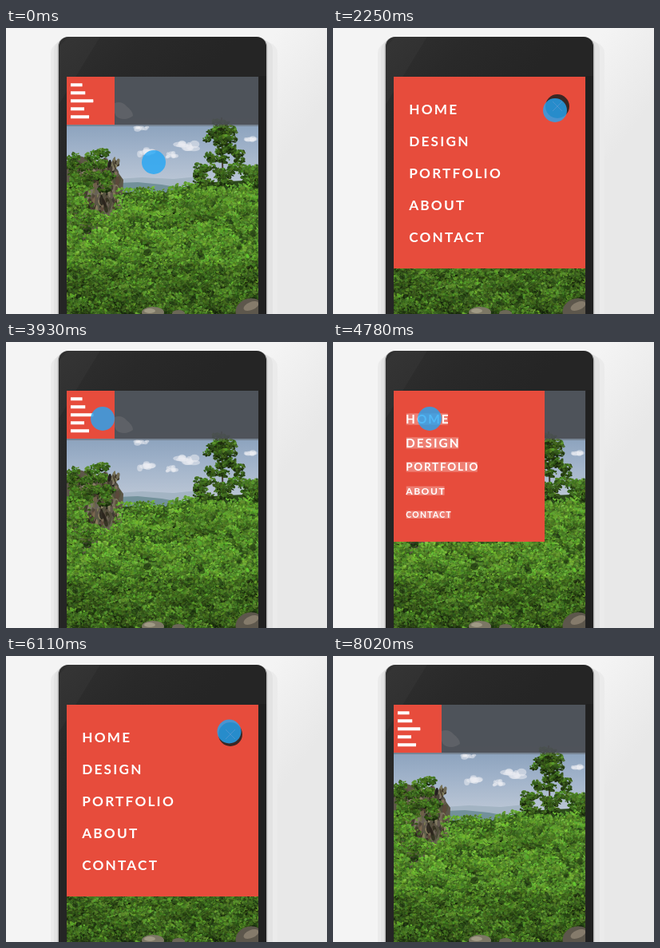
Animation, 402 px wide and 358 px high, one loop 8660 ms. Source, as an HTML page with a canvas:

```html
<!DOCTYPE html>
<html lang="en">
<head>
<meta charset="utf-8">
<title>Expanding menu</title>
<style>
html, body { margin: 0; width: 100%; height: 100%; overflow: hidden; background: #f4f4f4; }
canvas, svg { position: absolute; left: 0; top: 0; width: 402px; height: 358px; display: block; }
text { font: 700 17.2px Lato, "Open Sans", sans-serif; letter-spacing: 2.2px; fill: #fff; }
</style>
</head>
<body>
<canvas id="scene" width="402" height="358"></canvas>
<svg viewBox="0 0 402 358">
  <rect x="76" y="61" width="240" height="60" fill="#4b4e53" fill-opacity=".93"/>
  <path d="M136 94q9-3 15 4q8 6 8 12q-8 6-17 3q-6-3-6-8z" fill="#77797a" opacity=".4"/>
  <rect x="76" y="121" width="240" height="2" fill="#555" opacity=".4"/>
  <rect id="panel" x="76" y="61" fill="#e74c3c"/>
  <g id="items"></g>
  <g id="close">
    <circle cx="281" cy="98" r="15" fill="#3a2725"/>
    <path d="M275 92l12 12m0-12l-12 12" stroke="#e74c3c" fill="none"/>
  </g>
  <circle id="pointer" r="15" fill="#23a6f5" fill-opacity=".8"/>
</svg>
<script>
const LOOP = 8660;
const $ = id => document.getElementById(id);
const clamp = v => Math.max(0, Math.min(1, v));
const mix = (a, b, k) => a + (b - a) * k;
const smooth = k => k * k * (3 - 2 * k);

// CSS "ease": cubic-bezier(.25, .1, .25, 1)
function ease(x) {
  if (x <= 0) return 0;
  if (x >= 1) return 1;
  let lo = 0, hi = 1;
  for (let i = 0; i < 24; i++) {
    const u = (lo + hi) / 2, v = 1 - u;
    if (.75 * v * v * u + .75 * v * u * u + u * u * u < x) lo = u; else hi = u;
  }
  const v = 1 - lo;
  return .3 * v * v * lo + 3 * v * lo * lo + lo ** 3;
}

/* ---------- still scene ---------- */

const ctx = $('scene').getContext('2d');
let seed = 77;
function rnd() {
  seed = (seed + 0x6D2B79F5) | 0;
  let t = Math.imul(seed ^ seed >>> 15, 1 | seed);
  t = t + Math.imul(t ^ t >>> 7, 61 | t) ^ t;
  return ((t ^ t >>> 14) >>> 0) / 4294967296;
}
const jit = r => (rnd() * 2 - 1) * r;

function ramp(x0, y0, x1, y1, ...colors) {
  const g = ctx.createLinearGradient(x0, y0, x1, y1);
  colors.forEach((c, i) => g.addColorStop(i / (colors.length - 1), c));
  return g;
}
function box(x, y, w, h, r, fill) {
  ctx.fillStyle = fill;
  ctx.beginPath();
  ctx.roundRect(x, y, w, h, r);
  ctx.fill();
}
function blob(x, y, rx, ry, fill, turn = 0) {
  ctx.fillStyle = fill;
  ctx.beginPath();
  ctx.ellipse(x, y, rx, ry, turn, 0, 7);
  ctx.fill();
}
function shape(fill, ...pts) {
  ctx.fillStyle = fill;
  ctx.beginPath();
  for (let i = 0; i < pts.length; i += 2) ctx.lineTo(pts[i], pts[i + 1]);
  ctx.fill();
}

// A clump of leaves, lit from above
function clump(x, y, r, light, count) {
  for (let i = 0; i < count; i++) {
    const a = rnd() * 6.28, d = Math.sqrt(rnd()) * r;
    const dx = Math.cos(a) * d, dy = Math.sin(a) * d * .75;
    const l = 28 - dy / r * 13 + jit(9) + light;
    blob(x + dx, y + dy, .8 + rnd() * 1.7, .6 + rnd() * 1.1,
      `hsl(${93 + jit(7)} ${54 + jit(8)}% ${Math.max(9, l)}%)`, jit(1));
  }
}
function cloud(x, y, w, h) {
  for (let i = 0; i < 9; i++)
    blob(x + jit(w * .7), y + jit(h * .4), w * (.2 + rnd() * .25), h * (.25 + rnd() * .3), 'rgba(235,236,242,.55)');
}

function drawPhoto() {
  ctx.save();
  ctx.beginPath();
  ctx.rect(76, 61, 240, 297);
  ctx.clip();
  box(76, 61, 240, 150, 0, ramp(0, 100, 0, 195, '#7f98b5', '#9db0c8', '#bcc7d6'));
  cloud(170, 126, 10, 5);
  cloud(178, 155, 15, 8);
  cloud(208, 160, 9, 7);
  cloud(228, 148, 19, 9);
  cloud(306, 139, 9, 6);
  shape('#a3b4c3', 140, 189, 170, 187, 210, 189, 240, 186, 240, 215, 140, 215);
  shape('#72919a', 140, 194, 165, 193, 195, 196, 218, 200, 240, 196, 240, 220, 140, 220);
  shape('#2c4a1b', 76, 190, 145, 206, 200, 206, 240, 194, 316, 190, 316, 358, 76, 358);

  shape('#5d5748', 76, 172, 92, 160, 118, 168, 134, 172, 147, 190, 144, 250, 118, 270, 76, 262);
  for (let i = 0; i < 330; i++) {
    const x = 80 + rnd() * 62, y = 166 + rnd() * 76;
    blob(x, y, 1 + rnd() * 1.8, 2 + rnd() * 5, `hsl(${45 + jit(18)} ${16 + jit(7)}% ${30 + jit(18)}%)`, jit(.4));
  }
  for (let i = 0; i < 26; i++) clump(78 + rnd() * 48, 153 + rnd() * 48, 8, -3, 38);
  for (let i = 0; i < 7; i++) clump(125 + jit(14), 180 + jit(15), 5, -4, 20);

  // Tall tree on the right
  ctx.strokeStyle = '#443e2d';
  ctx.lineWidth = 2;
  ctx.beginPath();
  ctx.moveTo(272, 215);
  ctx.lineTo(270, 112);
  ctx.stroke();
  for (let i = 0; i < 62; i++) {
    const k = rnd(), half = 12 + 24 * k;
    clump(272 - k * 4 + jit(half), 117 + k * 80, 6, -5, 27);
  }
  for (let i = 0; i < 10; i++) clump(308 + jit(10), 184 + jit(12), 8, -3, 40);

  for (let y = 205; y < 368; y += 9)
    for (let x = 72; x < 326; x += 13) {
      const px = x + jit(7), py = y + jit(5);
      const rock = px > 98 && px < 143 && py < 234;
      if (rock || (px > 140 && px < 215 && py < 207)) continue;
      clump(px, py, 13, (py > 300 ? -5 : 3) + jit(6), 70);
    }
  for (let i = 0; i < 30; i++) blob(80 + rnd() * 234, 235 + rnd() * 115, 2 + rnd() * 4, 1 + rnd() * 4, 'rgba(18,34,12,.5)', jit(1));
  blob(304, 352, 17, 13, '#5d574c', -.4);
  blob(307, 348, 10, 5, '#857b6b', -.4);
  blob(184, 356, 14, 7, '#7c7765');
  blob(180, 354, 7, 3, '#a09a85');
  blob(216, 357, 8, 4, '#6b6757');
  ctx.restore();
}

function drawScene() {
  box(0, 0, 402, 358, 0, '#f4f4f4');
  box(326, 0, 76, 358, 0, ramp(328, 18, 410, 80, '#f4f4f4', '#eeeeee', '#e8e8e8'));
  box(56, 18, 284, 360, 14, '#ebebeb');
  box(60, 15, 274, 360, 13, '#e3e3e3');
  box(64.5, 11, 263, 360, 13, '#b9b9b9');
  box(66, 11, 260, 360, 12, ramp(66, 11, 180, 125, '#303030', '#292929', '#252525'));
  shape('rgba(255,255,255,.025)', 78, 11, 118, 11, 66, 96, 66, 24);
  box(317, 60, 9, 298, 0, '#202020');
  drawPhoto();
}

/* ---------- menu ---------- */

const ITEMS = [['HOME', 58, 445], ['DESIGN', 73, 445], ['PORTFOLIO', 113, 595], ['ABOUT', 68, 725], ['CONTACT', 92, 910]];
const SVG = 'http://www.w3.org/2000/svg';
function add(parent, tag, attrs) {
  const el = document.createElementNS(SVG, tag);
  for (const k in attrs) el.setAttribute(k, attrs[k]);
  return parent.appendChild(el);
}
const rows = ITEMS.map(([label, width, span]) => {
  const g = add($('items'), 'g', {});
  const bar = add(g, 'rect', { y: -8, width, height: 16, fill: '#fff' });
  add(g, 'text', { x: -.8, y: 6.2 }).textContent = label;
  return { g, bar, span };
});

// The second pass runs at half speed
const PASSES = [
  { open: 1195, close: 2480, slow: 1 },
  { open: 4275, close: 6835, slow: 2 }
];
const CLOSE_SPAN = 355;

function drawMenu(t) {
  const pass = PASSES[t < 3500 ? 0 : 1];
  const since = (t - pass.open) / pass.slow;
  const shut = (t - pass.close) / pass.slow / CLOSE_SPAN;
  const closing = shut > 0;
  const left = 1 - ease(shut);
  const grow = span => closing ? left : ease(since / span);
  const p = grow(595), size = mix(60, 240, p);
  $('panel').setAttribute('width', size);
  $('panel').setAttribute('height', size);

  const pitch = size / 6 * (closing ? 1 : 1 - .25 * p * (1 - p));
  const veil = closing ? (1 - p) ** 1.4 : 1 - p;
  rows.forEach(({ g, bar, span }, i) => {
    const y = 61 + size / 2 + (i - 2) * pitch + size / 240;
    g.setAttribute('transform', `translate(${76 + size / 12} ${y}) scale(${mix(.25, 1, grow(span))})`);
    bar.setAttribute('fill-opacity', veil);
  });
  $('close').setAttribute('opacity', closing ? clamp(1 - shut * 5) : smooth(clamp((since - 600) / 250)));
}

/* ---------- pointer ---------- */

const PATH = [
  [0, 185, 168], [660, 185, 168], [980, 124, 109], [2050, 124, 109], [2250, 278, 103],
  [3510, 278, 103], [3930, 121, 96], [5720, 121, 96], [6110, 279.5, 94.5], [6500, 279.5, 94.5],
  [6830, 282, 106], [LOOP, 282, 106]
];
function drawPointer(t) {
  const i = PATH.findIndex(k => k[0] > t);
  const [t0, x0, y0] = PATH[i - 1], [t1, x1, y1] = PATH[i];
  const k = smooth((t - t0) / (t1 - t0));
  const lift = t0 === 3510 ? 7 * Math.sin(Math.PI * k) : 0;
  $('pointer').setAttribute('cx', mix(x0, x1, k));
  $('pointer').setAttribute('cy', mix(y0, y1, k) - lift);
  $('pointer').setAttribute('opacity', clamp((8010 - t) / 230));
}

const start = performance.now();
function frame() {
  const t = Math.max(0, performance.now() - start) % LOOP;
  drawMenu(t);
  drawPointer(t);
  requestAnimationFrame(frame);
}
drawScene();
frame();
</script>
</body>
</html>
```
